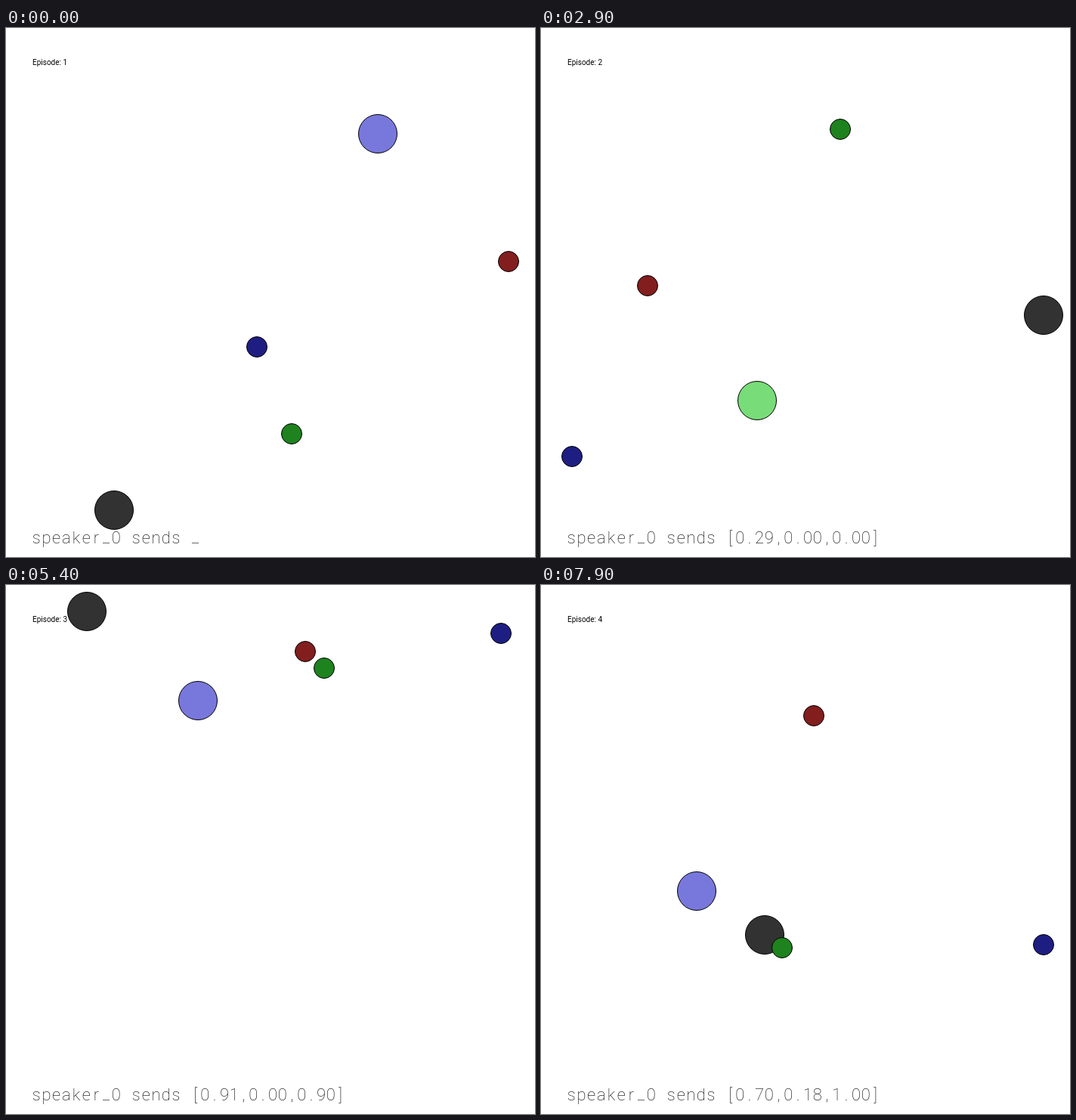
Animation, 700 px wide and 700 px high, one loop 8000 ms. Source, as an HTML page with a canvas:

```html
<!DOCTYPE html>
<html lang="en">
<head>
<meta charset="utf-8">
<title>Speaker and listener</title>
<style>
  html, body { margin: 0; width: 100%; height: 100%; overflow: hidden; background: #fff; }
  canvas { display: block; width: 700px; height: 700px; }
</style>
</head>
<body>
<canvas id="stage" width="700" height="700"></canvas>
<script>
const ctx = document.getElementById('stage').getContext('2d');
const LOOP = 8000, STEP = 100, EPISODE_STEPS = 25;

const RED = 'rgb(130,30,30)', GREEN = 'rgb(30,130,30)', BLUE = 'rgb(30,30,130)';
const LIGHT_GREEN = 'rgb(120,220,120)', LIGHT_BLUE = 'rgb(120,120,220)', GREY = 'rgb(50,50,50)';

// The listener glides from start to rest, with a damping rate per axis;
// the message drifts from say to end over the episode.
const episodes = [
  {
    speaker: [143, 638], red: [665, 309], green: [378, 537], blue: [332, 422],
    color: LIGHT_BLUE, start: [492, 140], rest: [239, 440], rate: [0.6, 0.28],
    say: [0.6, 0.03, 0.94], end: [0.504, 0.126, 0.892]
  },
  {
    speaker: [665, 380], red: [141, 341], green: [396, 134], blue: [41, 567],
    color: LIGHT_GREEN, start: [482, 539], rest: [152, 409], rate: [0.5, 0.31],
    say: [0.312, 0, 0], end: [0.183, 0, 0]
  },
  {
    speaker: [107, 35], red: [396, 88], green: [421, 110], blue: [655, 64],
    color: LIGHT_BLUE, start: [260, 230], rest: [222, 100], rate: [0.17, 0.5],
    say: [0.9, -0.02, 0.895], end: [0.964, 0.108, 0.927]
  },
  {
    speaker: [296, 463], red: [361, 173], green: [319, 480], blue: [665, 476],
    color: LIGHT_BLUE, start: [248, 373], rest: [160, 440], rate: [0.4, 0.4],
    say: [0.71, 0.16, 1], end: [0.65, 0.28, 1]
  }
];

const clamp = v => Math.min(1, Math.max(0, v));

// Critically damped approach
function listenerAt({ start, rest, rate }, s) {
  return rest.map((r, i) => {
    const u = rate[i] * s;
    return Math.round(r + (start[i] - r) * (1 + u) * Math.exp(-u));
  });
}

function message({ say, end }, s) {
  if (s === 0) return '_';
  const u = s / (EPISODE_STEPS - 1);
  return '[' + say.map((a, i) => clamp(a + (end[i] - a) * u).toFixed(2)).join(',') + ']';
}

function disc([x, y], r, color) {
  ctx.beginPath();
  ctx.arc(x, y, r - 0.5, 0, Math.PI * 2);
  ctx.fillStyle = color;
  ctx.fill();
  ctx.lineWidth = 1;
  ctx.strokeStyle = '#000';
  ctx.stroke();
}

// Thin lettering on an even pitch, slightly tighter inside the brackets
function caption(words, value) {
  ctx.font = '100 22px Roboto, Lato, sans-serif';
  ctx.fillStyle = '#000';
  ctx.textAlign = 'center';
  const row = (text, x, pitch) => [...text].forEach((ch, i) =>
    ctx.fillText(ch, x + pitch * i, ch === '_' ? 681 : 682));
  row(words, 40.2, 13.2);
  row(value, 250.5, 12.8);
}

function draw(time) {
  const frame = Math.floor((time % LOOP) / STEP);
  const index = Math.floor(frame / EPISODE_STEPS), s = frame % EPISODE_STEPS;
  const ep = episodes[index];

  ctx.fillStyle = '#fff';
  ctx.fillRect(0, 0, 700, 700);
  disc(ep.speaker, 26, GREY);
  disc(listenerAt(ep, s), 26, ep.color);
  disc(ep.red, 14, RED);
  disc(ep.green, 14, GREEN);
  disc(ep.blue, 14, BLUE);

  caption('speaker_0 sends', message(ep, s));
  ctx.font = '10px Roboto, "Liberation Sans", sans-serif';
  ctx.fillStyle = '#000';
  ctx.textAlign = 'left';
  ctx.fillText('Episode: ' + (index + 1), 35, 48.5);
}

const began = performance.now();
function tick() {
  draw(performance.now() - began);
  requestAnimationFrame(tick);
}
tick();
</script>
</body>
</html>
```
